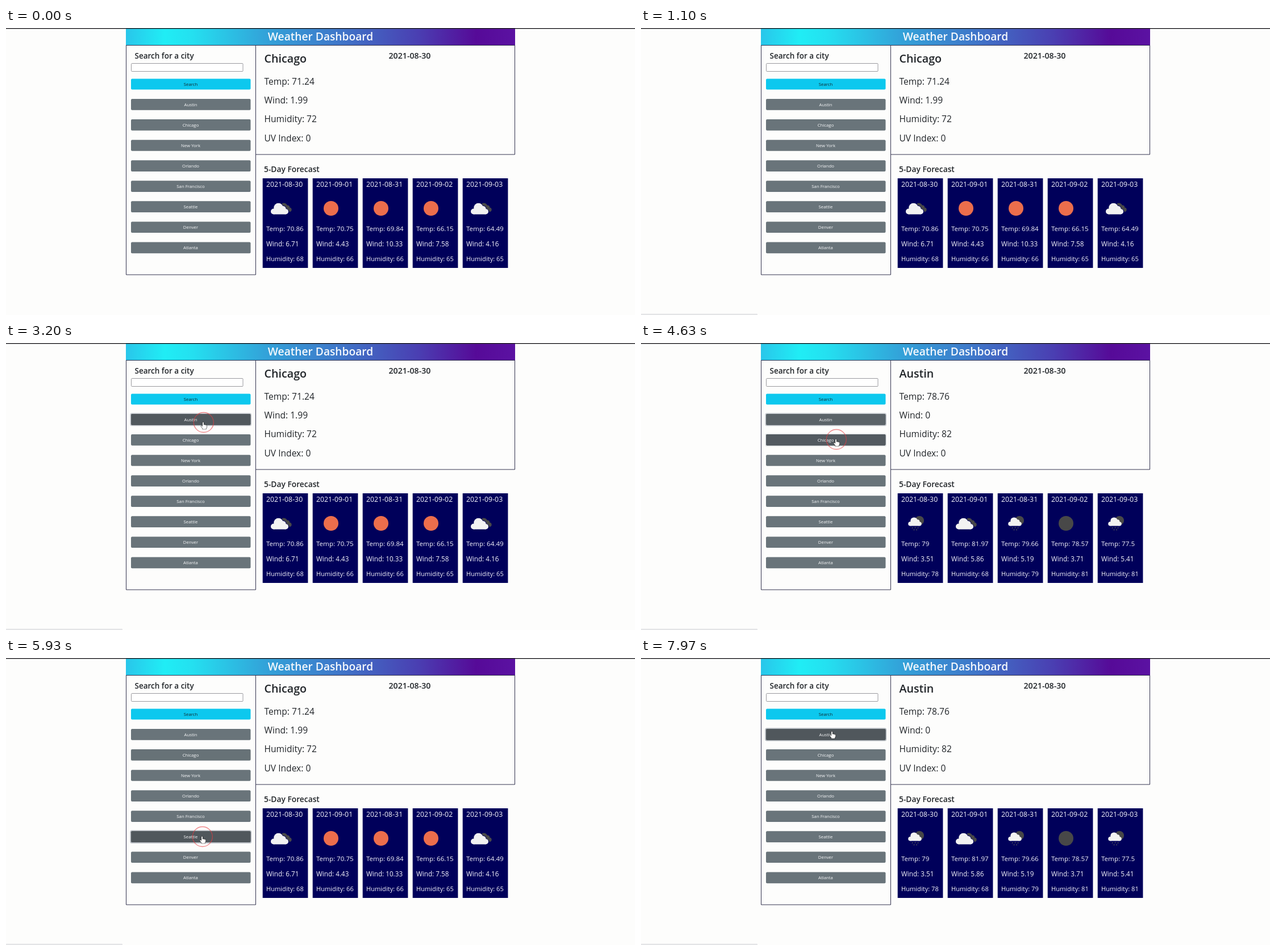
An HTML page with a canvas that plays this animation: 1107x506 px, repeating every 8000 ms.

```html
<!DOCTYPE html>
<html lang="en">
<head>
<meta charset="utf-8">
<title>Weather Dashboard</title>
<style>
html, body { margin: 0; width: 100%; height: 100%; overflow: hidden; background: #fdfdfc; }
canvas { display: block; }
</style>
</head>
<body>
<canvas id="stage" width="1107" height="506"></canvas>
<script>
const ctx = document.getElementById('stage').getContext('2d');
const LOOP = 8000, LOAD_DELAY = 350, RING_TIME = 400, FADE = 150;
const INK = '#212529', PAPER = '#fdfdfc', DARK = '#484848', WHITE = '#f2f2f2';
const FONT = '"Open Sans", "Noto Sans", sans-serif';

const cities = ['Austin', 'Chicago', 'New York', 'Orlando', 'San Francisco', 'Seattle', 'Denver', 'Atlanta'];
const dates = ['2021-08-30', '2021-09-01', '2021-08-31', '2021-09-02', '2021-09-03'];

// now: temp, wind, humidity, UV; days: icon, temp, wind, humidity
const weather = {
  Chicago: {
    now: [71.24, 1.99, 72, 0],
    days: [['clouds', 70.86, 6.71, 68], ['sun', 70.75, 4.43, 66], ['sun', 69.84, 10.33, 66],
      ['sun', 66.15, 7.58, 65], ['clouds', 64.49, 4.16, 65]]
  },
  Austin: {
    now: [78.76, 0, 82, 0],
    days: [['rain', 79, 3.51, 78], ['clouds', 81.97, 5.86, 68], ['rain', 79.66, 5.19, 79],
      ['moon', 78.57, 3.71, 81], ['rain', 77.5, 5.41, 81]]
  },
  Seattle: {
    now: [58.26, 1.01, 82, 0],
    days: [['moon', 52.83, 4.43, 88], ['clouds', 49.96, 5.35, 84], ['moon', 46.45, 0.6, 88],
      ['moon', 48.97, 1.83, 87], ['clouds', 51.76, 0.67, 77]]
  }
};

const clicks = [
  { t: 3100, city: 'Austin' },
  { t: 4600, city: 'Chicago' },
  { t: 5800, city: 'Seattle' },
  { t: 7500, city: 'Austin' }
];

// time, x, y of the pointer tip
const path = [
  [1300, 540, 520], [2700, 347, 140], [3500, 347, 140], [4350, 343, 170],
  [5000, 343, 170], [5600, 345, 315], [6600, 345, 315], [7330, 336, 130]
];

const buttonTop = i => 125 + i * 36.07;

function pointerAt(t) {
  if (t < path[0][0]) return null;
  for (let i = 1; i < path.length; i++) {
    const [t0, x0, y0] = path[i - 1], [t1, x1, y1] = path[i];
    if (t < t1) {
      const u = (t - t0) / (t1 - t0), k = u * u * (3 - 2 * u);
      return { x: x0 + (x1 - x0) * k, y: y0 + (y1 - y0) * k };
    }
  }
  const [, x, y] = path[path.length - 1];
  return { x, y };
}

function lastClick(t) {
  return clicks.filter(c => c.t <= t).pop();
}

function hoverAt(t) {
  const p = pointerAt(t);
  if (!p || p.x < 220 || p.x > 430) return -1;
  return cities.findIndex((c, i) => p.y >= buttonTop(i) && p.y <= buttonTop(i) + 20);
}

// Share of the last transition window in which a state held
function eased(t, test) {
  const steps = 10;
  let n = 0;
  for (let i = 0; i < steps; i++) if (test(t - i * FADE / steps)) n++;
  return n / steps;
}

function text(str, x, y, size, color = INK, weight = 400, align = 'left') {
  ctx.font = `${weight} ${size}px ${FONT}`;
  ctx.fillStyle = color;
  ctx.textAlign = align;
  ctx.fillText(str, x, y);
}

function box(x, y, w, h, fill, r = 0) {
  ctx.fillStyle = fill;
  ctx.beginPath();
  ctx.roundRect(x, y, w, h, r);
  ctx.fill();
}

function outline(x, y, w, h, color, r = 0) {
  ctx.strokeStyle = color;
  ctx.lineWidth = 1;
  ctx.beginPath();
  ctx.roundRect(x, y, w, h, r);
  ctx.stroke();
}

function disc(x, y, r, color) {
  ctx.fillStyle = color;
  ctx.beginPath();
  ctx.arc(x, y, r, 0, Math.PI * 2);
  ctx.fill();
}

// Cloud whose base is centred on x, y; s = 1 is 31 pixels wide
function cloud(x, y, s, color) {
  disc(x - 10.5 * s, y - 5 * s, 5 * s, color);
  disc(x - 2 * s, y - 11.5 * s, 8.3 * s, color);
  disc(x + 6 * s, y - 9.5 * s, 5.2 * s, color);
  disc(x + 10.7 * s, y - 4.8 * s, 4.8 * s, color);
  box(x - 10.5 * s, y - 9 * s, 21 * s, 9 * s, color);
}

const icons = {
  sun: (x, y) => disc(x, y, 13, '#ec6e4c'),
  moon: (x, y) => disc(x, y, 13, DARK),
  clouds(x, y) {
    cloud(x + 6.5, y + 6, 0.78, DARK);
    cloud(x - 2.5, y + 11, 1.08, '#00005a');
    cloud(x - 2.5, y + 10.5, 1, WHITE);
  },
  rain(x, y) {
    disc(x + 6, y - 5, 8, DARK);
    cloud(x - 2, y + 4.5, 0.76, WHITE);
    ctx.strokeStyle = '#55555a';
    ctx.lineWidth = 1.5;
    ctx.beginPath();
    for (const [dx, dy] of [[-6, 7], [-1, 6.5], [4, 7], [-3, 10.5], [1.5, 10.5]]) {
      ctx.moveTo(x + dx, y + dy);
      ctx.lineTo(x + dx - 0.8, y + dy + 1.8);
    }
    ctx.stroke();
  }
};

function header() {
  const g = ctx.createLinearGradient(211, 0, 896, 0);
  [[0, '#29c6ea'], [0.1, '#20edf5'], [0.17, '#24e0f0'], [0.35, '#32a5da'], [0.55, '#3f76c9'],
    [0.75, '#4a3fb2'], [0.9, '#560a98'], [1, '#5b12a2']].forEach(([p, c]) => g.addColorStop(p, c));
  box(211, 1, 685, 30, g);
  box(0, 0, 1107, 1.6, '#2b2a2e');
  text('Weather Dashboard', 553.5, 22.3, 19.2, '#f4f8fc', 600, 'center');
}

function sidebar(t) {
  outline(211.5, 30.5, 228, 404.5, '#33334f');
  text('Search for a city', 226.5, 53.6, 13.5, INK, 600);
  box(220, 62, 197.5, 14.5, '#fff', 1);
  outline(220.5, 62.5, 196.5, 14, '#9a9a9e', 1);
  box(220, 89.5, 210.5, 19, '#0dc8ee', 2);
  text('Search', 325, 101.9, 7.8, '#10282e', 400, 'center');

  cities.forEach((city, i) => {
    const y = buttonTop(i);
    const focus = eased(t, s => lastClick(s)?.city === city);
    const hover = eased(t - 100, s => hoverAt(s) === i);
    if (focus) box(218.2, y - 1.8, 214, 23.4, `rgba(130,138,150,${0.55 * focus})`, 3.5);
    box(220, y, 210.5, 19.7, '#69747a', 2);
    const dark = Math.max(focus, hover) * 0.8 + Math.min(focus, hover) * 0.2;
    if (dark) box(220, y, 210.5, 19.7, `rgba(80,87,92,${dark})`, 2);
    text(city, 325, y + 12.7, 7.8, '#f6f7f8', 400, 'center');
  });
}

function current(city) {
  outline(439.5, 30.5, 456, 192.5, '#33334f');
  text(city, 454.5, 60.6, 19.7, INK, 600);
  text(dates[0], 673.5, 53.6, 14.2, INK, 600);
  ['Temp', 'Wind', 'Humidity', 'UV Index'].forEach((label, i) => {
    text(`${label}: ${weather[city].now[i]}`, 454.5, 100.2 + i * 33.1, 15.6);
  });
}

function forecast(city) {
  text('5-Day Forecast', 454, 254.2, 13.8, INK, 600);
  weather[city].days.forEach(([icon, temp, wind, humidity], i) => {
    const x = 451.7 + i * 88;
    box(x, 265, 79.7, 158, '#00005a');
    text(dates[i], x + 6.3, 279.6, 12.3, '#f4f4fa');
    icons[icon](x + 32.3, 318);
    text(`Temp: ${temp}`, x + 6.3, 358, 11.6, '#f4f4fa');
    text(`Wind: ${wind}`, x + 6.3, 384.8, 11.7, '#f4f4fa');
    text(`Humidity: ${humidity}`, x + 6.3, 410.5, 11.1, '#f4f4fa');
  });
}

const hand = new Path2D('M-1 0Q0-1 1 0V5Q2 4 3 5Q4 4.4 5 5.5Q6 5 7 6.2V9Q7 11 5.5 12V13H-1V11.7L-4 8Q-4.6 6.5-3 6.4L-1 8Z');
const arrow = new Path2D('M0 0V12L2.8 9.4L4.7 13.5L6.4 12.7L4.6 8.7H8.3Z');

function pointer(t) {
  const p = pointerAt(t);
  if (!p) return;
  const click = lastClick(t);
  if (click && t - click.t < RING_TIME) {
    ctx.strokeStyle = 'rgba(232,60,66,0.6)';
    ctx.lineWidth = 1.4;
    ctx.beginPath();
    ctx.arc(p.x + 0.8, p.y, 17.5, 0, Math.PI * 2);
    ctx.stroke();
  }
  const shape = hoverAt(t) >= 0 ? hand : arrow;
  ctx.save();
  ctx.translate(p.x, p.y);
  ctx.scale(0.9, 0.9);
  ctx.lineWidth = 1.2;
  ctx.strokeStyle = '#222';
  ctx.stroke(shape);
  ctx.fillStyle = '#fff';
  ctx.fill(shape);
  ctx.restore();
}

function draw(t) {
  const shown = lastClick(t - LOAD_DELAY)?.city ?? 'Chicago';
  box(0, 0, 1107, 506, PAPER);
  header();
  sidebar(t);
  current(shown);
  forecast(shown);
  if (t >= 400) box(0, 503.8, 205, 3, '#e3e4e6', 1);
  pointer(t);
}

const start = performance.now();
function frame() {
  draw((performance.now() - start) % LOOP);
  requestAnimationFrame(frame);
}
frame();
</script>
</body>
</html>
```
